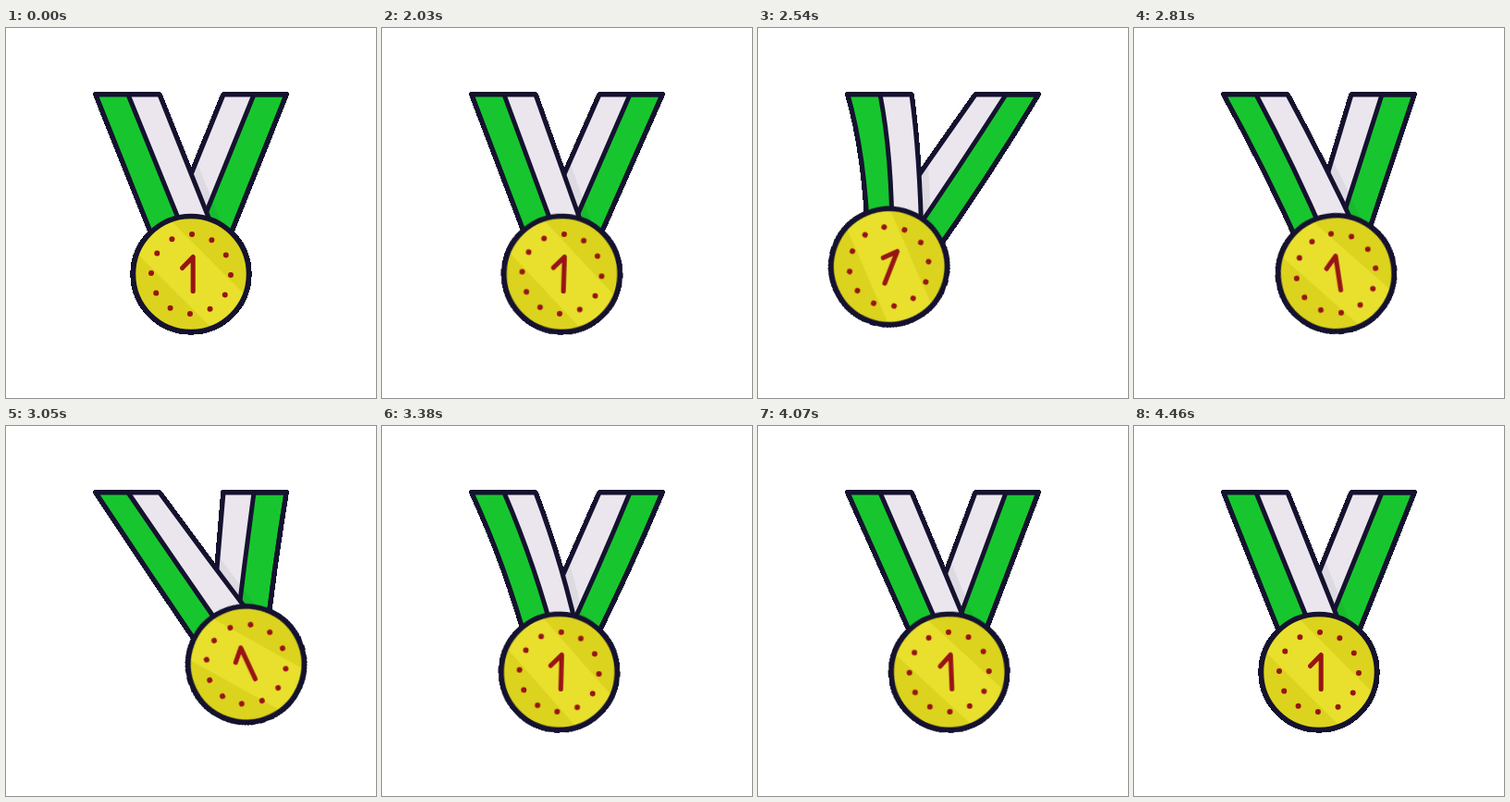
Animation of 400 by 400 pixels, one loop 5120 ms. Source, as an HTML page without scripts:

```html
<!DOCTYPE html>
<html lang="en">
<head>
<meta charset="utf-8">
<title>Swinging medal</title>
<style>
  html, body { margin: 0; width: 100%; height: 100%; overflow: hidden; background: #fff; }
  svg { display: block; width: 100vw; height: 100vh; }

  .ink { stroke: #15122f; stroke-width: 5; stroke-linejoin: round; }
  .edge { fill: none; stroke: #15122f; stroke-width: 5.7; stroke-linejoin: round; shape-rendering: crispEdges; }
  .white { fill: #ebe6ee; }
  .green { fill: #17c62e; }
  .shade { fill: none; stroke: #15122f; stroke-width: 21; opacity: .06; }
  .red { fill: none; stroke: #981414; stroke-linecap: round; stroke-linejoin: round; }

  .left, .left-stripe, .right, .right-stripe, .arm, .medal, .shine {
    animation: 5120ms linear infinite;
  }
  .left { animation-name: left; }
  .left-stripe { animation-name: left-stripe; }
  .right { animation-name: right; }
  .right-stripe { animation-name: right-stripe; }
  .arm { animation-name: arm; transform-origin: 200px 52px; }
  .medal { animation-name: medal; transform-origin: 200px 266px; }
  .shine { animation-name: shine; transform-origin: 200px 266px; }

  /* The medal hangs from a pivot and turns a little further than its arm. */
  @keyframes arm {
    0%, 39.64% { transform: rotate(0deg); }
    39.645% { transform: rotate(1.42deg); animation-timing-function: cubic-bezier(.39,.575,.565,1); }
    49.609% { transform: rotate(15.8deg); animation-timing-function: cubic-bezier(.3,0,.66,1.2); }
    59.57% { transform: rotate(-16.2deg); animation-timing-function: cubic-bezier(.33,.16,.67,.69); }
    66.016% { transform: rotate(2.2deg); animation-timing-function: cubic-bezier(.33,.6,.67,1); }
    69.531% { transform: rotate(7.3deg); animation-timing-function: cubic-bezier(.37,0,.63,1); }
    79.492% { transform: rotate(-1.8deg); animation-timing-function: cubic-bezier(.37,0,.63,1); }
    87.109%, 100% { transform: rotate(0deg); }
  }
  @keyframes medal {
    0%, 39.64% { transform: rotate(0deg); }
    39.645% { transform: rotate(.4deg); animation-timing-function: cubic-bezier(.39,.575,.565,1); }
    49.609% { transform: rotate(5.6deg); animation-timing-function: cubic-bezier(.3,0,.66,1.2); }
    59.57% { transform: rotate(-8.8deg); animation-timing-function: cubic-bezier(.33,.16,.67,.69); }
    66.016% { transform: rotate(-.7deg); animation-timing-function: cubic-bezier(.33,.6,.67,1); }
    69.531% { transform: rotate(2.7deg); animation-timing-function: cubic-bezier(.37,0,.63,1); }
    79.492% { transform: rotate(-.6deg); animation-timing-function: cubic-bezier(.37,0,.63,1); }
    87.109%, 100% { transform: rotate(0deg); }
  }
  /* The bright band resists the extra turn on the swing to the right. */
  @keyframes shine {
    0%, 49.609% { transform: rotate(0deg); animation-timing-function: ease-in-out; }
    59.57% { transform: rotate(9deg); }
    66.016% { transform: rotate(2deg); }
    69.531%, 100% { transform: rotate(0deg); }
  }

  /* Ribbon tops stay put; the lower ends follow the medal. */
  @keyframes left {
    0%, 39.64% { d: path("M97 72Q130.5 156 164 240L233 240Q199.5 156 166 72Z"); }
    39.645% { d: path("M97 72Q129 156 161 240L226 240Q196 156 166 72Z"); animation-timing-function: cubic-bezier(.39,.575,.565,1); }
    49.609% { d: path("M97 72Q116 138 119 232L177 232Q175 138 166 72Z"); animation-timing-function: cubic-bezier(.3,0,.66,1.2); }
    59.57% { d: path("M97 72Q156.5 162 218 252L281 226Q222.5 149 166 72Z"); animation-timing-function: cubic-bezier(.33,.16,.67,.69); }
    66.016% { d: path("M97 72Q134 152 158 240L215 240Q196.5 152 166 72Z"); animation-timing-function: cubic-bezier(.33,.6,.67,1); }
    69.531% { d: path("M97 72Q124 148 143 236L207 236Q188 148 166 72Z"); animation-timing-function: cubic-bezier(.37,0,.63,1); }
    79.492% { d: path("M97 72Q134.5 156 172 240L236 240Q201 156 166 72Z"); animation-timing-function: cubic-bezier(.37,0,.63,1); }
    87.109%, 100% { d: path("M97 72Q130.5 156 164 240L233 240Q199.5 156 166 72Z"); }
  }
  @keyframes left-stripe {
    0%, 39.64% { d: path("M97 72Q130.5 156 164 240L200 240Q166 156 132 72Z"); }
    39.645% { d: path("M97 72Q129 156 161 240L194 240Q163 156 132 72Z"); animation-timing-function: cubic-bezier(.39,.575,.565,1); }
    49.609% { d: path("M97 72Q116 138 119 232L145 232Q145 138 132 72Z"); animation-timing-function: cubic-bezier(.3,0,.66,1.2); }
    59.57% { d: path("M97 72Q156.5 162 218 252L245 236Q188 154 132 72Z"); animation-timing-function: cubic-bezier(.33,.16,.67,.69); }
    66.016% { d: path("M97 72Q134 152 158 240L189 240Q166.5 152 132 72Z"); animation-timing-function: cubic-bezier(.33,.6,.67,1); }
    69.531% { d: path("M97 72Q124 148 143 236L175 236Q156 148 132 72Z"); animation-timing-function: cubic-bezier(.37,0,.63,1); }
    79.492% { d: path("M97 72Q134.5 156 172 240L205 240Q168.5 156 132 72Z"); animation-timing-function: cubic-bezier(.37,0,.63,1); }
    87.109%, 100% { d: path("M97 72Q130.5 156 164 240L200 240Q166 156 132 72Z"); }
  }
  @keyframes right {
    0%, 39.64% { d: path("M303 72Q269.5 156 236 240L167 240Q201 156 235 72Z"); }
    39.645% { d: path("M303 72Q266 156 229 240L161 240Q198 156 235 72Z"); animation-timing-function: cubic-bezier(.39,.575,.565,1); }
    49.609% { d: path("M303 72Q247.5 164 185 252L129 225Q181 148 235 72Z"); animation-timing-function: cubic-bezier(.3,0,.66,1.2); }
    59.57% { d: path("M303 72Q290 152 281 232L222 226Q228.5 149 235 72Z"); animation-timing-function: cubic-bezier(.33,.16,.67,.69); }
    66.016% { d: path("M303 72Q268 156 226 240L160 240Q198.5 156 235 72Z"); animation-timing-function: cubic-bezier(.33,.6,.67,1); }
    69.531% { d: path("M303 72Q260 160 213 246L151 233Q194 153 235 72Z"); animation-timing-function: cubic-bezier(.37,0,.63,1); }
    79.492% { d: path("M303 72Q271 156 239 240L173 240Q204 156 235 72Z"); animation-timing-function: cubic-bezier(.37,0,.63,1); }
    87.109%, 100% { d: path("M303 72Q269.5 156 236 240L167 240Q201 156 235 72Z"); }
  }
  @keyframes right-stripe {
    0%, 39.64% { d: path("M303 72Q269.5 156 236 240L200 240Q234 156 268 72Z"); }
    39.645% { d: path("M303 72Q266 156 229 240L195 240Q231.5 156 268 72Z"); animation-timing-function: cubic-bezier(.39,.575,.565,1); }
    49.609% { d: path("M303 72Q247.5 164 185 252L159 236Q215.5 154 268 72Z"); animation-timing-function: cubic-bezier(.3,0,.66,1.2); }
    59.57% { d: path("M303 72Q290 152 281 232L248 230Q257.5 151 268 72Z"); animation-timing-function: cubic-bezier(.33,.16,.67,.69); }
    66.016% { d: path("M303 72Q268 156 226 240L194 240Q233.5 156 268 72Z"); animation-timing-function: cubic-bezier(.33,.6,.67,1); }
    69.531% { d: path("M303 72Q260 160 213 246L182 238Q227 156 268 72Z"); animation-timing-function: cubic-bezier(.37,0,.63,1); }
    79.492% { d: path("M303 72Q271 156 239 240L206 240Q237 156 268 72Z"); animation-timing-function: cubic-bezier(.37,0,.63,1); }
    87.109%, 100% { d: path("M303 72Q269.5 156 236 240L200 240Q234 156 268 72Z"); }
  }
</style>
</head>
<body>
<svg viewBox="0 0 400 400">
  <defs>
    <clipPath id="right-area"><path class="right"/></clipPath>
    <clipPath id="disc"><circle cx="200" cy="266" r="62"/></clipPath>
  </defs>

  <!-- Hard outer silhouette -->
  <path class="right edge"/>
  <path class="left edge"/>
  <g class="arm"><circle class="edge" cx="200" cy="266" r="62.8"/></g>

  <path class="right white"/>
  <path class="right-stripe green"/>
  <g clip-path="url(#right-area)"><path class="left shade"/></g>
  <path class="right-stripe ink" fill="none"/>
  <path class="right ink" fill="none"/>

  <path class="left white ink"/>
  <path class="left-stripe green ink"/>

  <g class="arm">
    <g class="medal">
      <circle cx="200" cy="266" r="62" fill="#dbd31d"/>
      <g class="shine">
        <path d="M140 206L260 326" stroke="#e8e02d" stroke-width="51" clip-path="url(#disc)"/>
      </g>
      <circle class="ink" cx="200" cy="266" r="62.5" fill="none" style="stroke-width:5.5"/>
      <circle class="red" cx="200" cy="266" r="43" stroke-width="6" pathLength="12"
              stroke-dasharray="0 1" transform="rotate(1.4 200 266)"/>
      <path class="red" d="M190.5 259.5L202.2 247.5V284.5" stroke-width="5.1"/>
    </g>
  </g>
</svg>
</body>
</html>
```
